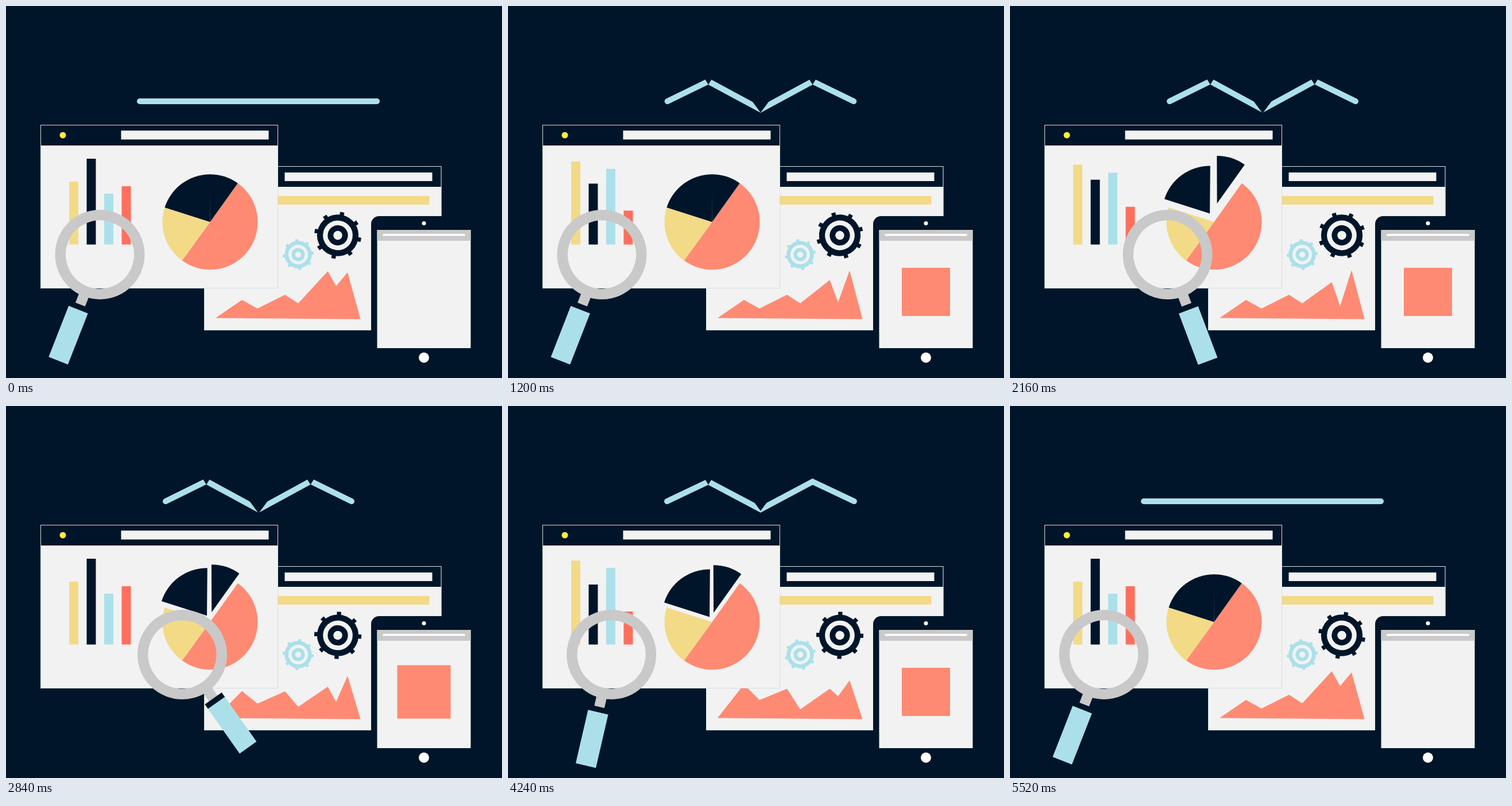
These frames come from a looping animation (864 by 648 pixels, 5.56 s). An HTML page with a canvas:

```html
<!DOCTYPE html>
<html>
<head>
<meta charset="utf-8">
<style>
html, body { margin: 0; width: 100%; height: 100%; overflow: hidden; background: #001529; }
canvas { display: block; }
</style>
</head>
<body>
<canvas id="stage" width="864" height="648"></canvas>
<script>
const c = document.getElementById('stage').getContext('2d');
const LOOP = 5560, STEP = 40, RAD = Math.PI / 180;
const NAVY = '#001529', PAPER = '#f2f2f2', CORAL = '#ff8a73', RED = '#ff6f5e',
      YELLOW = '#f3da87', CYAN = '#abe0ea', GREY = '#c9c9c9';
let t = 0;

const mix = (a, b, u) => a + (b - a) * u;
const ease = (u, p) => u < .5 ? .5 * (2 * u) ** p : 1 - .5 * (2 - 2 * u) ** p;
// 0 before `from`, 1 after `to`
const rise = (from, to, p = 3) => ease(Math.min(1, Math.max(0, (t - from) / (to - from))), p);
// up between a and b, down again between d and e
const pulse = (a, b, d, e, p) => rise(a, b, p) - rise(d, e, p);

function rect(color, x0, y0, x1, y1) {
  c.fillStyle = color;
  c.fillRect(x0, y0, x1 - x0, y1 - y0);
}
function disc(color, x, y, r) {
  c.fillStyle = color;
  c.beginPath();
  c.arc(x, y, r, 0, 7);
  c.fill();
}
function ring(color, x, y, outer, inner) {
  c.strokeStyle = color;
  c.lineWidth = outer - inner;
  c.beginPath();
  c.arc(x, y, (outer + inner) / 2, 0, 7);
  c.stroke();
}
function poly(color, pts) {
  c.fillStyle = color;
  c.beginPath();
  pts.forEach(([x, y]) => c.lineTo(x, y));
  c.fill();
}

function zigzag() {
  const a = pulse(390, 1310, 4080, 5000);
  const peak = 166 - 35 * a;
  c.strokeStyle = CYAN;
  c.lineWidth = 10;
  c.lineCap = 'round';
  c.beginPath();
  [[233 + 45 * a, 166], [349, peak], [440, 166 + 14.3 * a], [530.5, peak], [646 - 44 * a, 166]]
    .forEach(([x, y]) => c.lineTo(x, y));
  c.stroke();
  c.lineCap = 'butt';
  // the joints split open when fully folded
  const notch = (x, tip, w, h) => poly(NAVY, [[x - w, tip - h], [x + w, tip - h], [x, tip]]);
  if (a > .93) notch(440, 187 - (1 - a) * 200, 20, 27);
  if (a > .97) notch(349, 137, 8, 13);
  if (a > .985) notch(530.5, 137, 8, 13);
}

function panel(x0, y0, x1, y1) {
  rect(PAPER, x0, y0, x1, y1);
  rect(NAVY, x0, y0, x1, y0 + 36);
  c.strokeStyle = '#d5dde0';
  c.lineWidth = 1;
  c.strokeRect(x0 + .5, y0 + .5, x1 - x0 - 1, y1 - y0 - 1);
}

function gear(color, x, y, r, turn) {
  c.save();
  c.translate(x, y);
  c.rotate(turn * RAD);
  ring(color, 0, 0, r * .88, r * .63);
  ring(color, 0, 0, r * .43, r * .19);
  for (let i = 0; i < 8; i++) {
    rect(color, -r * .09, -r, r * .09, -r * .8);
    c.rotate(Math.PI / 4);
  }
  c.restore();
}

function mountains() {
  const dip = pulse(400, 1660, 2000, 3680), swell = pulse(2000, 3680, 3700, 5400);
  const point = (x, y, swellBy, dipBy = 0) => [x, y + swell * swellBy + dip * dipBy];
  poly(CORAL, [
    [365, 543.5],
    point(411, 512, -31), point(438, 527, -17), point(486, 503, -12), point(509, 518, 12),
    point(560.5, 462, 35, 19), point(575, 488, 20, 35), point(595, 464, 16, -4),
    [617.5, 545.5]
  ]);
}

function bars() {
  const swap = pulse(400, 1410, 1800, 2800) + pulse(2960, 4000, 4240, 5440);
  const bar = (i, color, top, swapped) => {
    const x = 110 + 30.5 * i;
    rect(color, x, mix(top, swapped, swap), x + 16, 415.5);
  };
  bar(0, YELLOW, 306, 269.5);
  bar(1, NAVY, 266, 311);
  bar(2, CYAN, 327, 282);
  bar(3, RED, 314, 358);
}

function slice(color, from, to, dx = 0, dy = 0) {
  c.fillStyle = color;
  c.beginPath();
  c.moveTo(355.5 + dx, 376.3 + dy);
  c.arc(355.5 + dx, 376.3 + dy, 83, from * RAD, to * RAD);
  c.fill();
}
function pie() {
  // each slice pops out, settles back a little, then closes
  const left = 11 * pulse(1160, 1800, 3900, 4820) + 6 * pulse(1160, 1800, 1800, 2600);
  const right = 17 * pulse(1440, 2320, 4000, 5000) + 16 * pulse(1440, 2320, 2320, 2800);
  slice(CORAL, -54.5, 126);
  slice(YELLOW, 126, 197.7);
  slice(NAVY, 197.7, 270.5, -.5 * left, -left);
  slice(NAVY, 269.8, 305.5, .16 * right, -right);
}

function tablet() {
  c.fillStyle = NAVY;
  c.beginPath();
  c.roundRect(636, 366, 184, 270, 14);
  c.fill();
  rect(PAPER, 646.5, 390, 809.5, 596);
  rect(GREY, 646.5, 390, 809.5, 409);
  rect('#fff', 656.5, 397, 799.5, 400.5);
  disc('#fff', 728, 378.5, 3.5);
  disc('#fff', 728, 612.5, 9);
  const s = 42 * pulse(220, 830, 4400, 5010) + 4.5 * pulse(2180, 2780, 3060, 3660);
  rect(CORAL, 728 - s, 498 - s, 728 + s, 498 + s);
}

function magnifier() {
  const sweep = p => pulse(1070, 2890, 3000, 4860, p);
  c.save();
  c.translate(mix(163.5, 307, sweep(3.6)), 433);
  c.rotate(mix(21.4, -35.3, sweep(3)) * RAD);
  rect(GREY, -9, 74, 9, 94);
  rect(NAVY, -18, 93.5, 18, 104);
  rect(CYAN, -18, 103, 18, 198.5);
  ring(GREY, 0, 0, 78, 59.5);
  c.restore();
}

function draw() {
  rect(NAVY, 0, 0, 864, 648);
  zigzag();

  panel(345, 279, 758.5, 565);
  rect(PAPER, 485.5, 290, 742.5, 305);
  rect(YELLOW, 470, 331, 737.5, 346);
  const turn = 540 * Math.min(1, t / 5520);
  gear(NAVY, 578, 399.5, 41, 11 - turn);
  gear(CYAN, 509, 433, 27, -6 + 1.5 * turn);
  mountains();

  panel(60, 207, 474, 492);
  disc('#ffeb3b', 99, 225, 5.5);
  rect(PAPER, 200.5, 217, 457.5, 232.5);
  bars();
  pie();

  tablet();
  magnifier();
}

const start = performance.now();
function frame() {
  t = Math.floor((performance.now() - start) % LOOP / STEP) * STEP;
  draw();
  requestAnimationFrame(frame);
}
frame();
</script>
</body>
</html>
```
